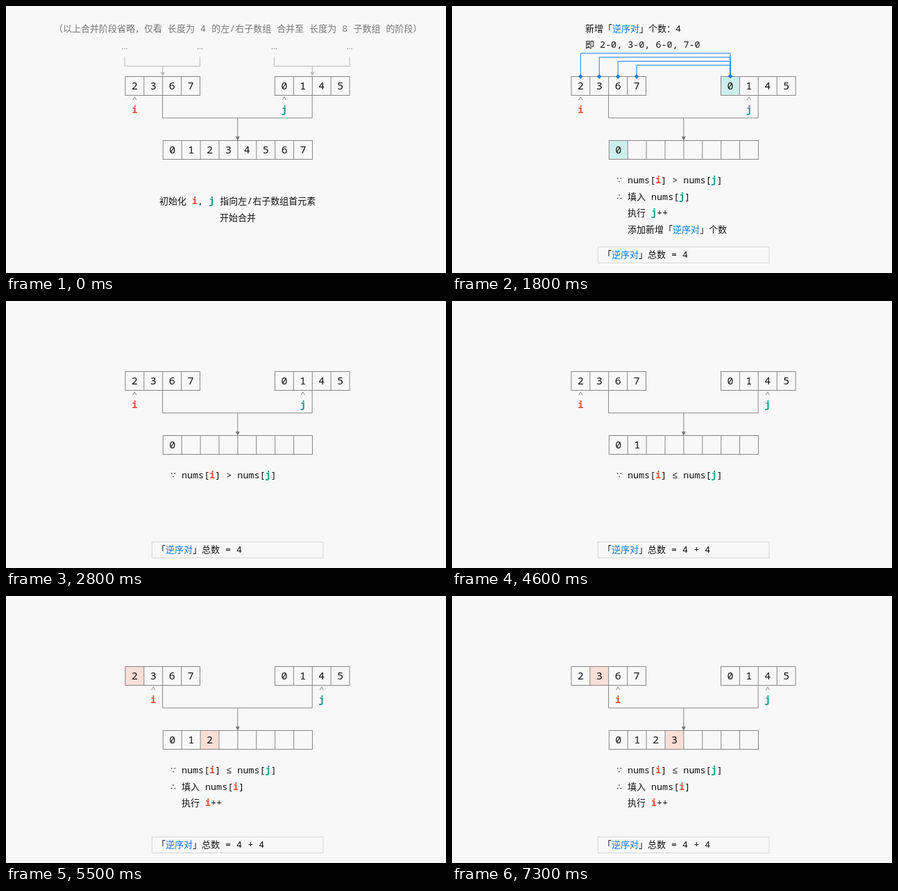
Write an HTML page that moves like this. It is 634 px wide and 384 px high and loops after 8000 ms.

```html
<!DOCTYPE html>
<html lang="zh-CN">
<head>
<meta charset="utf-8">
<title>Merge step: counting inversions</title>
<style>
  html, body { margin: 0; width: 100%; height: 100%; overflow: hidden; background: #f8f8f8; }
  svg { display: block; width: 634px; height: 384px; }
  text { font: 13.4px "Noto Sans Mono", "DejaVu Sans Mono", monospace; fill: #111; white-space: pre; text-spacing-trim: space-all; }
  .cjk { font: 13px "Noto Sans CJK SC", "Noto Sans CJK", sans-serif; }
  .num { font-size: 15px; text-anchor: middle; }
  .note text { fill: #777; }
  .blue { fill: #0b7ae6; }
  .i { fill: #e4512f; font-weight: 700; }
  .j { fill: #1c9c8a; font-weight: 700; }
  .ptr { font-size: 14px; text-anchor: middle; }
  .line { fill: none; stroke: #888; stroke-width: 1; }
  .soft { fill: none; stroke: #bbb; stroke-width: 1; }
  .link { fill: none; stroke: #1a80e6; stroke-width: 1; }
</style>
</head>
<body>
<svg id="stage" viewBox="0 0 634 384"></svg>
<script>
const CELL = 26.9, WIDE = 13, HALF = 8.04;
const LEFT = 171.9, RIGHT = 387.5, OUT = 226.3;
const TEAL = '#cdefeb', PINK = '#fbded6';
const left = [2, 3, 6, 7], right = [0, 1, 4, 5];
const merged = [0, 1, 2, 3, 4, 5, 6, 7];

// i, j: pointers; n: merged count; take: array just read from
const steps = [
  { at: 0, i: 0, j: 0, n: 8, intro: true },
  { at: 900, i: 0, j: 0, n: 0, op: '>', sum: '0' },
  { at: 1800, i: 0, j: 1, n: 1, op: '>', take: 'j', sum: '4' },
  { at: 2800, i: 0, j: 1, n: 1, op: '>', sum: '4' },
  { at: 3700, i: 0, j: 2, n: 2, op: '>', take: 'j', sum: '4 + 4' },
  { at: 4600, i: 0, j: 2, n: 2, op: '≤', sum: '4 + 4' },
  { at: 5500, i: 1, j: 2, n: 3, op: '≤', take: 'i', sum: '4 + 4' },
  { at: 6400, i: 1, j: 2, n: 3, op: '≤', sum: '4 + 4' },
  { at: 7300, i: 2, j: 2, n: 4, op: '≤', take: 'i', sum: '4 + 4' }
];
const LOOP = 8000;

const escapeText = s => s.replace(/&/g, '&amp;').replace(/</g, '&lt;').replace(/>/g, '&gt;');
const path = (d, cls = 'line') => `<path class="${cls}" d="${d}"/>`;
const mid = (x, k) => x + (k + 0.5) * CELL;

// Mixed text on a fixed grid: wide CJK glyphs, half-width Latin
function write(x, y, str) {
  const runs = str.match(/逆序对|\b[ij]\b|[∵∴]|[\u3000-\uffef]+?(?=逆序对|[^\u3000-\uffef]|$)|[^\u3000-\uffef]+?(?=\b[ij]\b|[\u3000-\uffef]|$)/g);
  return runs.map(run => {
    const wide = /[\u3000-\uffef]/.test(run);
    const cls = (wide ? 'cjk ' : '') + (run === '逆序对' ? 'blue' : /^[ij]$/.test(run) ? run : '');
    const out = `<text class="${cls}" x="${x}" y="${y}">${escapeText(run)}</text>`;
    x += run.length * (wide ? WIDE : HALF);
    return out;
  }).join('');
}

function row(x, y, values, size, mark, color) {
  let s = mark >= 0 ? `<rect x="${x + mark * CELL}" y="${y}" width="${CELL}" height="27" fill="${color}"/>` : '';
  s += `<rect class="line" x="${x}" y="${y}" width="${size * CELL}" height="27"/>`;
  for (let k = 1; k < size; k++) s += path(`M${x + k * CELL} ${y}v27`);
  values.forEach((v, k) => s += `<text class="num" x="${mid(x, k)}" y="${y + 18.6}">${v}</text>`);
  return s;
}

function pointer(name, x) {
  return path(`M${x - 2.6} 135.2L${x} 130.8l2.6 4.4`) +
    `<text class="ptr ${name}" x="${x}" y="153.5">${name}</text>`;
}

const head = (x, y, color) => `<path fill="${color}" d="M${x - 3} ${y - 6}h6l-3 6z"/>`;

function bracket(x) {
  const a = x - 1, b = x + 4 * CELL, m = x + 2 * CELL;
  const dots = [a, b].map(c =>
    [-3, 0, 3].map(d => `<circle cx="${c + d}" cy="61.5" r=".8" fill="#888"/>`).join('')).join('');
  return dots + path(`M${a} 73V86.5H${b}V73M${m} 86.5V96`, 'soft') + head(m, 101, '#bbb');
}

const diamond = (x, y) => `<path class="blue" d="M${x - 3.3} ${y}l3.3-3.3 3.3 3.3-3.3 3.3z"/>`;

function links(k) {
  const end = mid(RIGHT, k);
  return left.map((v, n) => {
    const x = mid(LEFT, n);
    return path(`M${x} 101.5V${68 + n * 5.7}H${end}V101.5`, 'link') + diamond(x, 101.5);
  }).join('') + diamond(end, 101);
}

function scene(p) {
  const byI = p.take === 'i', byJ = p.take === 'j';
  let s = row(LEFT, 101.5, left, 4, byI ? p.i - 1 : -1, PINK) +
    row(RIGHT, 101.5, right, 4, byJ ? p.j - 1 : -1, TEAL) +
    row(OUT, 193.5, merged.slice(0, p.n), 8, p.take ? p.n - 1 : -1, byI ? PINK : TEAL) +
    path('M225.6 128.5V161H441.2V128.5M333.8 161V189') + head(333.8, 193.8, '#777') +
    pointer('i', mid(LEFT, p.i)) + pointer('j', mid(RIGHT, p.j));

  if (p.intro) {
    return s + bracket(LEFT) + bracket(RIGHT) +
      `<g class="note">${write(69, 37, '（以上合并阶段省略，仅看 长度为 4 的左/右子数组 合并至 长度为 8 子数组 的阶段）')}</g>` +
      write(221, 285, '初始化 i, j 指向左/右子数组首元素') + write(308, 309, '开始合并');
  }

  s += write(237, 255, '∵') + write(253, 255, `nums[i] ${p.op} nums[j]`);
  if (p.take) {
    s += write(237, 278.5, '∴') + write(253, 278.5, `填入 nums[${p.take}]`) +
      write(253, 302, `执行 ${p.take}++`);
  }
  if (byJ) {
    const v = right[p.j - 1];
    s += write(253, 325.5, '添加新增「逆序对」个数') +
      write(192, 36.5, '新增「逆序对」个数：4') +
      write(192, 60, '即 ' + left.map(u => `${u}-${v}`).join(', ')) +
      links(p.j - 1);
  }
  return s + '<rect x="210.3" y="346.5" width="246.7" height="23" fill="none" stroke="#ccc" stroke-dasharray="1.5 .5"/>' +
    write(217, 362, `「逆序对」总数 = ${p.sum}`);
}

const stage = document.getElementById('stage');
const start = performance.now();
let shown = null;

function tick() {
  const t = (performance.now() - start) % LOOP;
  const step = steps.filter(p => p.at <= t).pop();
  if (step !== shown) stage.innerHTML = scene(shown = step);
  requestAnimationFrame(tick);
}
tick();
</script>
</body>
</html>
```
